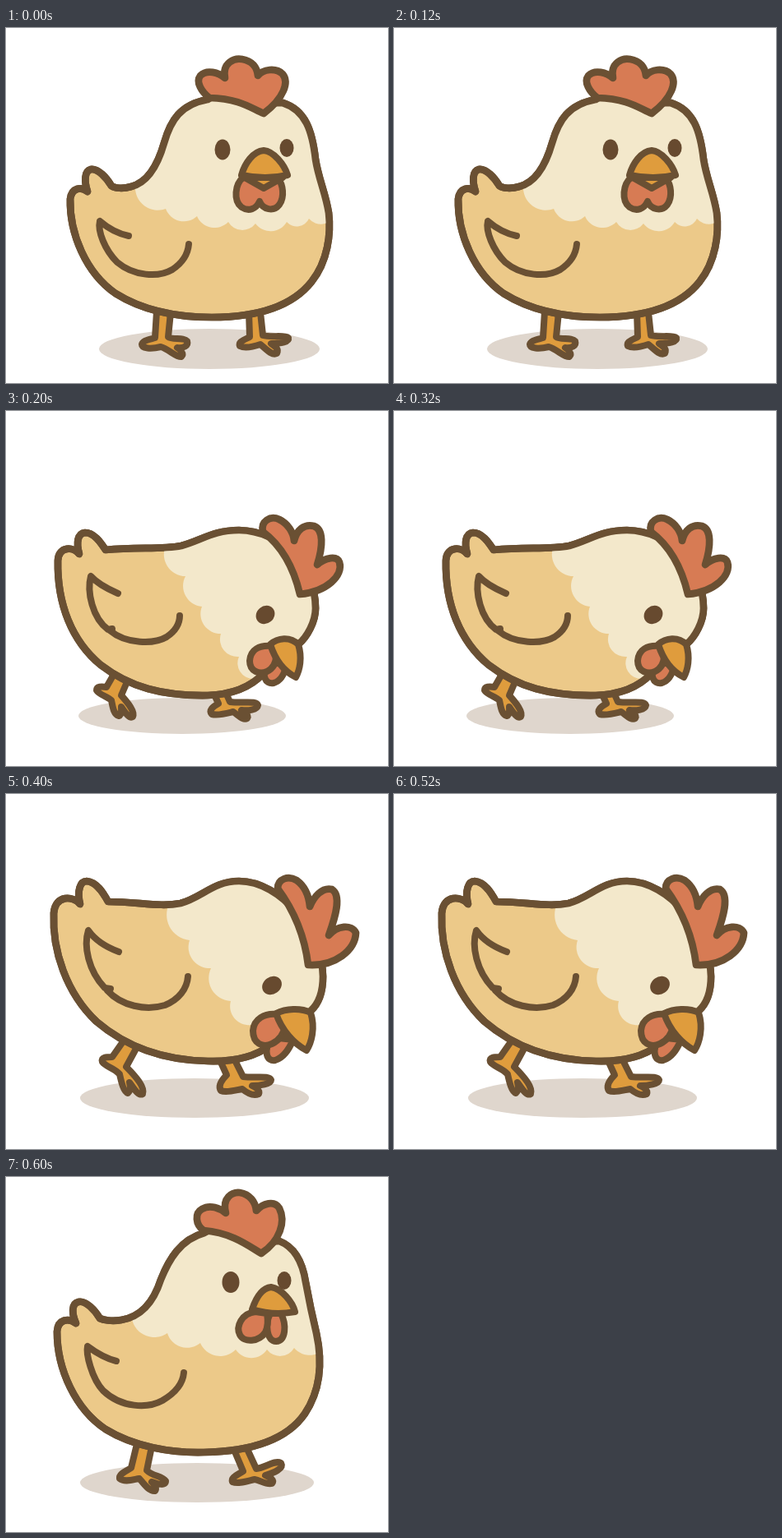
Animation, 464 px wide and 432 px high, one loop 0.8 s. Source, as an HTML page:

```html
<!DOCTYPE html>
<html lang="en">
<head>
<meta charset="utf-8">
<title>Pecking hen</title>
<style>
html, body { margin: 0; width: 100%; height: 100%; overflow: hidden; background: #fff; }
svg { display: block; width: 464px; height: 432px; }
g { visibility: hidden; }
g.on { visibility: visible; }
path { stroke: #6a5033; stroke-width: 8.7; stroke-linejoin: round; stroke-linecap: round; fill: none; }
.shadow { fill: #dfd6cd; }
.body { fill: #ecc989; }
.cream { fill: #f3e8cb; stroke: none; }
.comb, .wattle { fill: #d77b54; }
.beak, .leg { fill: #df9c3d; }
.leg, .beak, .wattle, .wing { stroke-width: 8; }
.eye { fill: #674a2f; }
</style>
</head>
<body>
<svg id="stage" viewBox="0 0 464 432"></svg>
<script>
const STEP = 200;

// eyes: x, y, rx, ry, turn; bib: cusps of the scalloped edge
const poses = [
  {
    shadow: [247, 390.5, 134, 24.5],
    legs: ['M183 345L181 377C174 379 166 380 165 385C165 390 176 391 188 388C198 391 207 401 213 400C217 396 211 391 208 389C215 390 222 387 220 381C216 376 202 380 197 376L200 346',
           'M295 346L296 376C288 380 282 382 284 387C290 390 300 388 309 385C316 391 323 399 329 396C332 390 326 387 322 384C334 384 344 382 343 377C338 373 322 377 312 374L309 346'],
    body: 'M245 87C212 93 200 112 192 140C184 168 172 188 152 193C142 196 132 195 128 192C122 182 112 171 103 172C95 174 95 187 99 199C91 193 80 194 78 208C77 250 97 298 133 323C168 345 211 352 250 352C307 352 348 338 371 309C391 284 395 250 392 225C388 200 380 185 376 160C372 125 364 100 336 91L312 92L285 78L262 76Z',
    bib: [[157, 193], [194, 220], [232, 229], [270, 236], [303, 238], [341, 236], [368, 232], [400, 228]],
    comb: 'M313 104C298 98 285 86 247 85C238 78 230 66 236 58C244 50 258 54 266 61C262 42 278 36 287 38C299 40 305 48 306 58C312 50 328 48 336 56C344 66 338 85 313 104Z',
    wing: 'M149 253C135 250 122 242 114 235C111 247 120 270 135 285C155 302 185 304 202 294C214 286 221 275 222 263',
    wattle: ['M288 182C278 190 276 210 286 218C295 224 304 220 308 211C312 221 325 224 332 215C339 205 336 190 331 184Z'],
    beak: ['M290 182L313 195L336 182Z', 'M286 179C290 165 300 150 313 149C325 150 338 166 342 179C325 183 305 183 286 179Z'],
    eyes: [[263, 148, 9.5, 12.5, 0], [341, 146, 8.5, 11, 0]]
  },
  {
    shadow: [214, 371, 126, 22],
    legs: ['M130 322L122 336C116 335 110 335 110 340C113 345 122 347 128 352C130 362 131 369 137 371C141 370 140 363 140 360C144 366 150 375 154 372C157 366 148 355 140 346L149 325',
           'M253 345L258 356C251 360 246 364 250 369C258 371 268 368 276 366C282 370 288 377 293 374C296 369 288 366 286 364C294 365 305 364 306 358C304 352 288 356 272 354L268 345'],
    body: 'M121 169C160 165 188 169 213 164C238 157 252 145 283 145C335 146 376 190 376 240C376 256 366 275 355 284L312 320C298 335 275 345 245 346C190 347 150 336 115 309C80 280 62 235 63 182C64 164 82 165 89 174C85 160 87 149 96 148C107 148 115 160 121 169Z',
    bib: [[194, 164], [218, 201], [238, 238], [261, 271], [283, 299], [300, 326]],
    comb: 'M357 223C350 193 336 165 312 147C309 134 321 127 332 132C342 137 349 147 350 158C353 145 362 137 374 140C386 144 385 165 378 187C388 178 402 176 405 184C410 200 390 220 357 223Z',
    wing: 'M136 222C120 215 110 209 103 201C98 220 105 252 124 266L129 265M126 267C146 284 180 284 195 275C207 267 211 258 211 249',
    wattle: ['M318 306C309 321 315 333 325 331C333 329 338 322 341 308Z',
             'M322 286C308 285 297 290 296 304C296 317 308 321 317 317C325 313 328 306 328 298Z'],
    beak: ['M321 284C330 276 345 274 355 284C360 300 357 315 352 324C340 318 328 306 321 284Z'],
    eyes: [[315, 248, 12, 10.5, -40]]
  },
  {
    shadow: [229, 370, 139, 24],
    legs: ['M143 300L129 320C122 320 115 320 117 326C121 332 131 333 138 341C140 350 143 363 148 364C152 361 151 355 150 351C155 358 161 368 166 365C169 357 158 344 146 332L159 308',
           'M258 320L268 342C262 348 257 355 261 361C268 364 280 360 287 359C293 364 300 368 307 365C309 360 303 357 299 355C308 355 322 353 322 348C319 342 303 346 288 344L276 320'],
    body: 'M124 131C160 131 187 138 212 133C238 126 252 106 283 106C335 106 384 170 385 222C385 240 380 255 370 264L321 306C302 320 275 326 245 325C190 324 145 307 110 277C73 242 56 190 58 145C60 122 82 124 90 134C86 118 90 106 98 106C110 107 118 120 124 131Z',
    bib: [[199, 132], [223, 178], [249, 212], [273, 252], [298, 281]],
    comb: 'M367 208C363 175 350 142 330 115C330 103 343 99 353 105C364 113 368 125 369 137C374 125 384 113 396 116C408 124 400 150 392 172C402 160 420 158 425 169C424 190 400 210 367 208Z',
    wing: 'M137 192C118 185 107 176 100 166C94 185 100 215 120 236L127 237M123 239C140 258 170 264 193 257C210 250 220 237 221 222',
    wattle: ['M322 296C312 314 317 326 327 324C337 321 343 312 349 299Z',
             'M330 268C314 266 301 274 300 288C300 304 312 309 323 304C332 300 338 291 339 282Z'],
    beak: ['M328 267C340 261 358 260 370 266C376 285 371 303 365 312C350 304 335 288 328 267Z'],
    eyes: [[323, 233, 12.5, 10.5, -35]]
  },
  {
    shadow: [232, 372, 142, 24],
    legs: ['M159 325L152 354C146 358 137 361 138 367C144 372 155 368 162 367C167 373 174 383 181 382C184 378 179 373 177 371C185 374 194 376 194 370C190 364 178 364 171 357L177 328',
           'M277 332L288 358C280 363 273 366 275 371C282 374 293 370 302 368C309 369 316 375 323 373C327 368 319 365 315 363C325 360 338 355 334 348C326 344 315 354 304 355L293 331'],
    body: 'M241 68C212 76 198 100 188 125C180 150 165 170 140 174C128 176 118 174 114 172C108 162 97 150 88 152C79 154 80 167 85 178C76 171 63 173 62 188C62 235 85 283 121 307C155 328 200 336 240 335C298 334 341 320 363 288C383 258 384 222 377 190C371 165 368 150 364 128C360 102 350 85 332 78L308 80L288 66L260 58Z',
    bib: [[153, 173], [196, 190], [236, 202], [279, 210], [317, 210], [350, 208], [390, 204]],
    comb: 'M310 93C295 84 275 68 240 65C230 58 229 44 238 39C248 33 260 38 267 44C262 25 275 18 284 19C296 21 303 30 304 41C312 32 326 28 332 38C340 54 333 78 310 93Z',
    wing: 'M134 224C118 220 107 212 99 206C97 215 104 245 118 260C140 281 172 282 190 272C207 262 215 250 216 238',
    wattle: ['M321 166C314 180 317 200 328 200C340 199 341 180 334 166Z',
             'M303 164C286 166 279 182 284 192C289 202 307 201 315 189C319 181 318 172 317 166Z'],
    beak: ['M299 161C304 146 312 135 322 134C335 136 348 152 351 164C335 167 315 166 299 161Z'],
    eyes: [[273, 128, 10.5, 13, 0], [338, 126, 8.5, 11, 0]]
  }
];

const path = (cls, d) => `<path class="${cls}" d="${d}"/>`;
const paths = (cls, list) => list.map(d => path(cls, d)).join('');
const oval = (cls, [x, y, rx, ry, turn = 0]) =>
  `<ellipse class="${cls}" cx="${x}" cy="${y}" rx="${rx}" ry="${ry}" transform="rotate(${turn} ${x} ${y})"/>`;

// Scalloped edge, closed around the head; the body clips the rest.
function bibPath(pts) {
  let d = `M${pts[0]}`;
  for (let i = 1; i < pts.length; i++) {
    const [a, b] = [pts[i - 1], pts[i]];
    const r = Math.hypot(b[0] - a[0], b[1] - a[1]) * 0.6;
    d += `A${r} ${r} 0 0 0 ${b}`;
  }
  return d + `H420V40H${pts[0][0]}Z`;
}

function hen(p, i) {
  return `<g><clipPath id="clip${i}"><path d="${p.body}"/></clipPath>` +
    oval('shadow', p.shadow) +
    paths('leg', p.legs) +
    path('body', p.body) +
    `<path class="cream" clip-path="url(#clip${i})" d="${bibPath(p.bib)}"/>` +
    path('outline', p.body) +
    path('comb', p.comb) +
    path('wing', p.wing) +
    paths('wattle', p.wattle) +
    paths('beak', p.beak) +
    p.eyes.map(e => oval('eye', e)).join('') + '</g>';
}

const stage = document.getElementById('stage');
stage.innerHTML = poses.map(hen).join('');
const groups = [...stage.querySelectorAll('g')];
const start = performance.now();

function draw() {
  const t = Math.max(0, performance.now() - start);
  const now = Math.floor(t / STEP) % poses.length;
  groups.forEach((g, i) => g.classList.toggle('on', i === now));
  requestAnimationFrame(draw);
}
draw();
</script>
</body>
</html>
```
